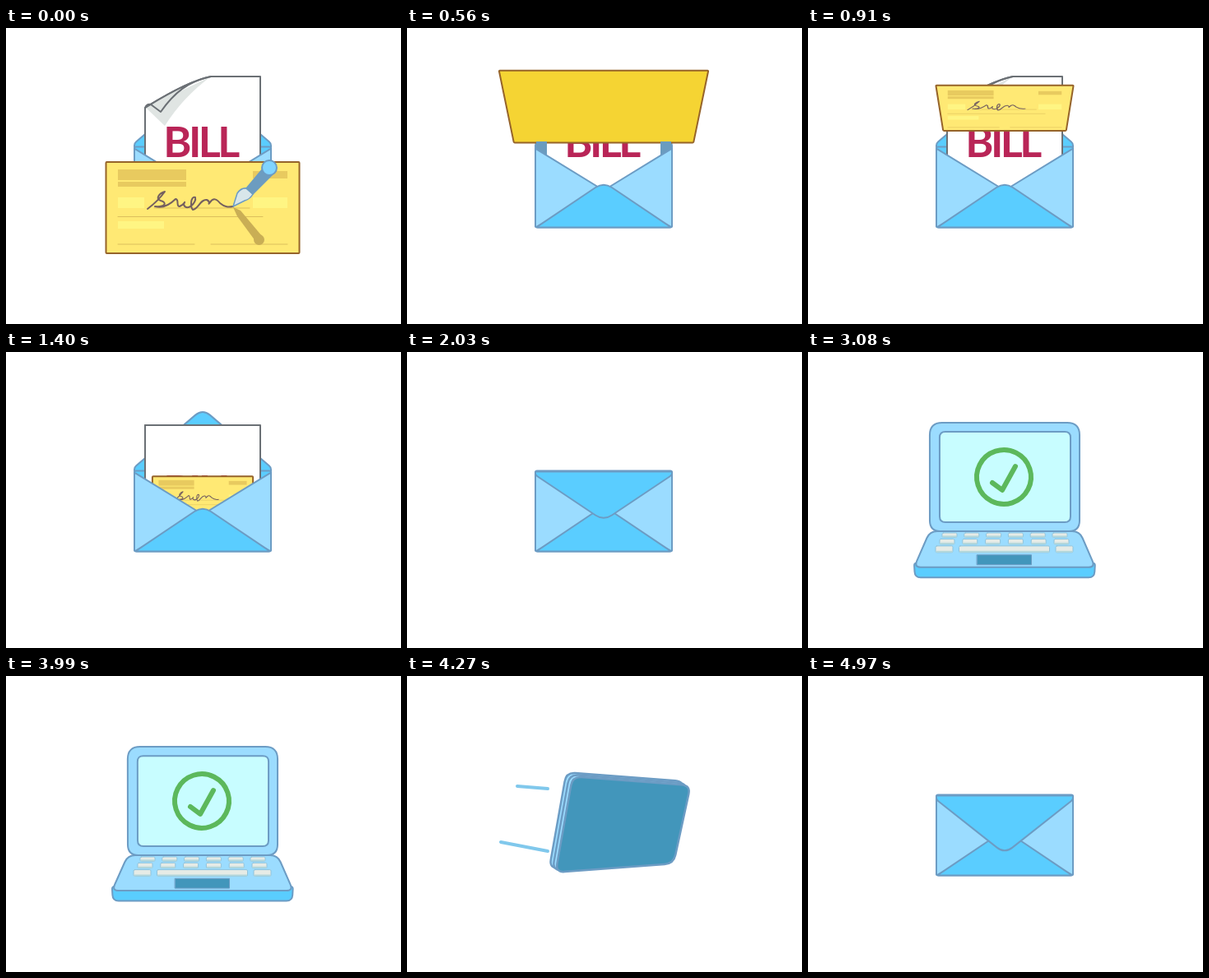
An HTML page that plays this animation: 480x360 px, repeating every 5.04 s.

```html
<!DOCTYPE html>
<html lang="en">
<head>
<meta charset="utf-8">
<title>Paying a bill</title>
<style>
  html, body { margin: 0; width: 100%; height: 100%; overflow: hidden; background: #fff; }
  svg { display: block; width: 480px; height: 360px; }
  text { font: 700 52px Lato, "Open Sans", sans-serif; letter-spacing: -3.5px; }
</style>
</head>
<body>
<svg id="stage" viewBox="0 0 480 360" stroke-linejoin="round" stroke-linecap="round"></svg>
<script>
const LOOP = 5040, STEP = 70, DEPTH = 450, MID = 239;
const LINE = '#6c9cc4', PALE = '#9bdcff', SKY = '#5acdff', DEEP = '#4296bb';
const { PI, sin, cos, min, max, abs, hypot, exp } = Math;
const stage = document.getElementById('stage');

// Progress from 0 to 1 between two times: even, and eased
const ramp = (t, a, b) => min(1, max(0, (t - a) / (b - a)));
const ease = (t, a, b) => { const u = ramp(t, a, b); return u * u * (3 - 2 * u); };

const shape = (d, fill, stroke = 'none', width = 2) =>
  `<path d="${d}" fill="${fill}" stroke="${stroke}" stroke-width="${width}"/>`;
const rect = (x, y, w, h, fill, more = '') =>
  `<rect x="${x}" y="${y}" width="${w}" height="${h}" fill="${fill}" ${more}/>`;

// Closed polygon; each point is [x, y, corner radius]
function poly(pts, fill, stroke = LINE, width = 2) {
  const toward = (p, q, r) => {
    const f = min(r / (hypot(q[0] - p[0], q[1] - p[1]) || 1), .5);
    return [p[0] + (q[0] - p[0]) * f, p[1] + (q[1] - p[1]) * f];
  };
  const d = pts.map((p, i) => {
    const prev = pts.at(i - 1), next = pts[(i + 1) % pts.length], r = p[2] || 0;
    return `${i ? 'L' : 'M'}${toward(p, prev, r)} Q${p[0]},${p[1]} ${toward(p, next, r)}`;
  }).join(' ');
  return shape(d + 'Z', fill, stroke, width);
}

// Projection of a card turned about its vertical axis
const view = (x, y, a = 0, shear = 0) => ([u, v, r]) => {
  const f = DEPTH / (DEPTH + u * sin(a));
  return [x + u * cos(a) * f - v * shear, y + v * f, r];
};

const box = (w, h, r) => [[-w, -h, r], [w, -h, r], [w, h, r], [-w, h, r]];
const back = see => poly(box(83, 49, 2).map(see), SKY);

// k runs from -1 (open) to 1 (closed)
const flap = (k, see) => poly([[-83, -48, 1], [-83, -48 + 5 * k, 3], [0, -48 + 73.5 * k, 12],
  [83, -48 + 5 * k, 3], [83, -48, 1]].map(see), SKY);

function pocket(see) {
  const side = s => poly([[83 * s, -47, 2], [83 * s, 49, 2], [0, 4]].map(see), PALE);
  return side(-1) + side(1) + poly([[-82, 49, 2], [0, -6.2, 12], [82, 49, 2]].map(see), SKY);
}

function bill(t, drop) {
  const curl = 1 - ease(t, 1050, 1330);
  const f = (x, y) => `${169 + x * curl},${59 + y * curl} `;
  const edge = 'C' + f(10, 32) + f(50, 6) + f(80, 0);
  return `<g transform="translate(0 ${drop})">` +
    shape(`M169,290 L${f(0, 38)}${edge}L309,59 309,290Z`, '#fff', '#6b7075') +
    shape(`M${f(1, 38)}L${f(24, 60)}Q${f(46, 25)}${f(80, 0)}Z`, '#e0e5e3') +
    shape(`M${f(0, 38)}${edge}C${f(52, 6)}${f(35, 20)}${f(19, 43)}L${f(7, 34)}Q${f(2, 33)}${f(0, 38)}Z`,
      '#dfe4e2', '#6b7075') +
    '<text x="236" y="156.5" text-anchor="middle" fill="#b92557">BILL</text></g>';
}

const SIGNATURE = 'M172,220C180,214 188,206 193,199C186,201 181,208 188,210C196,212 194,218 181,217' +
  'C192,220 200,214 206,208C211,208 206,217 211,217C218,214 218,208 216,215' +
  'C220,224 232,212 230,206C224,204 224,218 227,221C234,220 236,208 244,209' +
  'C250,212 244,216 248,212C252,206 256,208 260,213C266,218 270,218 276,217';

const chequeFace =
  rect(136, 172, 83, 13, '#e8ca5f') + rect(136, 187, 83, 6, '#e8ca5f') + rect(300, 174, 42, 9, '#e8ca5f') +
  rect(136, 206, 32, 13, '#fff583') + rect(300, 206, 42, 13, '#fff583') + rect(136, 235, 56, 9, '#fff583') +
  shape('M180,219H296M136,229.5H312M136,263H229M249,263H342', 'none', '#dcbf5c', 1) +
  shape(SIGNATURE, 'none', '#75605f');

// One full somersault along an arc, shrinking on the way down
function cheque(t, drop) {
  const u = ramp(t, 140, 1120), e = ease(t, 140, 1120);
  const a = 2 * PI * e, c = cos(a);
  const y = drop + 218.5 - 68.5 * e - 95 * sin(PI * u);
  const s = 1 - .48 * ease(t, 560, 1120);
  const tilt = ([u, v, r]) => {
    const f = s * DEPTH / (DEPTH - v * s * sin(a));
    return [MID + u * f, y + v * c * f, r];
  };
  const sheet = poly(box(117.5, 55.5, 1).map(tilt), c > 0 ? '#ffe974' : '#f5d433', '#96642a');
  return sheet + (c > .05 ?
    `<g transform="translate(${MID} ${y}) scale(${s} ${s * c}) translate(${-MID} -218.5)">${chequeFace}</g>` : '');
}

function pen(t) {
  if (t >= 350) return '';
  const dx = 230 * ramp(t, 0, 350) ** 2;
  return `<g clip-path="url(#paper)"><g transform="translate(${dx * .8} ${-dx * .1})">` +
    shape('M276,218 L285,222 311,253 303,259 281,229Z', '#c9ae55') +
    '<circle cx="307.5" cy="257.5" r="6.5" fill="#c9ae55"/></g></g>' +
    `<g transform="translate(${dx} ${-dx * .45})">` +
    shape('M276,217 L281,201 Q286,194 292,195 L300,202 Q297,208 290,210Z', '#d8e6ea', LINE, 1.5) +
    shape('M291,195 L312,170 324,179 300,203Z', '#6c9cc0') +
    `<circle cx="320" cy="170" r="9" fill="#80d4ff" stroke="${LINE}" stroke-width="2"/></g>`;
}

function letter(t) {
  const see = view(MID, 193.5);
  const k = 2 * ease(t, 1680, 2100) - 1.04;
  const drop = 240 * ramp(t, 1120, 1680) ** 3;
  const before = t < 560;
  let out = (k < 0 ? flap(k, see) : '') + back(see);
  if (t < 1680) out += `<g clip-path="url(#inside)">${bill(t, drop)}${before ? '' : cheque(t, drop)}</g>`;
  if (t >= 490 && t <= 630)
    out += rect(157, 138, 13, 19, '#6a9cbf') + rect(308, 138, 13, 19, '#6a9cbf');
  out += pocket(see) + (k >= 0 ? flap(k, see) : '');
  return out + (before ? cheque(t, 0) + pen(t) : '');
}

// Envelope on one side, closed laptop on the other
function spin(t) {
  const a = PI * (ease(t, 2170, 2500) + ease(t, 4150, 4590));
  const there = ramp(t, 2170, 2520), again = ramp(t, 4130, 4760);
  const shift = 48 * sin(PI * again) - 14 * sin(2 * PI * there);
  const shear = .2 * sin(2 * PI * again) + .15 * sin(PI * there);
  const p = ease(t, 2200, 2450) - ease(t, 4150, 4370);
  const x = MID + shift, y = 193.5 - 30 * p;
  if (cos(a) > 0) {
    const see = view(x, y, a, shear);
    return back(see) + pocket(see) + flap(.96, see);
  }
  const s = sin(a - PI), slab = box(83 + 8 * p * p, 50 + 13 * p * p, 11);
  const layer = (i, fill) => poly(slab.map(
    view(x - 7 * s * i, y - 4.5 * abs(s) * i, a - PI, shear)), fill, LINE, 2.5);
  return layer(2, PALE) + layer(1, PALE) + layer(0, DEEP);
}

// Speed lines that grow to the left, then shrink; t is 0 at full length
function streaks(t, late) {
  const from = 1 - ramp(t, -140, 0), to = 1 - ramp(t, 0, 160);
  if (from >= 1 || to <= 0) return '';
  const streak = (x, y, w, h) =>
    shape(`M${x + w * from},${y + h * from} L${x + w * to},${y + h * to}`, 'none', '#80c8ec', 4);
  return late ? streak(134, 134, 37, 3) + streak(114, 202, 57, 11)
    : streak(106, 130, 20, 2) + streak(107, 193, 52, -3);
}

function keyboard() {
  const cap = (x, y, w, h) => rect(x, y, w, h, '#e6ebe6', 'rx="1.5" stroke="#8fc3dc" stroke-width="1"') +
    rect(x + .5, y + h - 2, w - 1, 2, '#b4d8dc');
  let out = '';
  for (let i = 0; i < 6; i++)
    out += cap(163 + i * 26.8, 220, 18, 5.5) + cap(160 + i * 27.8, 227.5, 18, 6.5);
  return out + cap(155, 236, 21, 8) + cap(183.5, 236, 110, 8) + cap(301, 236, 21, 8) +
    rect(205.5, 247, 66, 12, DEEP, `stroke="${LINE}"`);
}

function tick(t, squash) {
  const line = (p, tag) => p &&
    `<${tag} pathLength="1" stroke-dasharray="${p} 2"/>` || '';
  return `<g fill="none" stroke="#5cb85c" stroke-width="6"
    transform="translate(238 152) scale(1 ${squash})">` +
    line(ramp(t, 2450, 2870), 'circle r="33" transform="rotate(207)"') +
    line(ramp(t, 2730, 2940), 'path d="M-14,7 L-2,16 14,-13"') + '</g>';
}

function laptop(t) {
  // Springs open, folds shut
  const age = t - 2450;
  const q = 1 - exp(-.0081 * age) * cos(.008 * age) - ease(t, 3980, 4200);
  const bend = 4 * q * (1 - q);
  const top = 102 - 16 * q, wide = 91 + 5 * bend, x = MID - 2 * bend;
  const inset = top + 11 + 8 * (1 - q);
  const front = 100 + 162 * q, open = min(1, max(0, 2 * q));
  const low = front + 1 + 11.5 * open;
  const l = MID - 8 * bend - 91 - 19 * open, r = MID - 8 * bend + 91 + 19 * open;
  const rim = front - 5 * max(0, 2 * q - 1);
  const strip = poly([[l, rim, 3], [r, rim, 3], [r - 1, low, 7], [l + 1, low, 7]], SKY);
  const lid =
    poly([[x - wide, top, 15], [x + wide, top, 15], [MID + 91, 218, 13], [MID - 91, 218, 13]], PALE) +
    poly([[x - wide + 12, inset, 7], [x + wide - 11, inset, 7], [MID + 80, 207, 7], [MID - 79, 207, 7]], '#c8fdff') +
    tick(t, .3 + .7 * q);
  if (low < 227)
    return lid + poly([[l, low - 2, 3], [r, low - 2, 3], [MID + 91, 227, 8], [MID - 91, 227, 8]], DEEP) + strip;
  return lid + strip +
    poly([[MID - 91, 218, 9], [MID + 91, 218, 9], [r, front, 8], [l, front, 8]], PALE) +
    `<g transform="translate(0 218) scale(1 ${max(0, (front - 218) / 44)}) translate(0 -218)">${keyboard()}</g>`;
}

const clips = `<defs><clipPath id="inside">${rect(0, 0, 480, 241, '#000')}</clipPath>
  <clipPath id="paper">${rect(122, 164, 233, 109, '#000')}</clipPath></defs>`;

function draw(now) {
  const t = Math.floor(now % LOOP / STEP) * STEP;
  const scene = t <= 2100 ? letter : t >= 2450 && t < 4200 ? laptop : spin;
  const late = t > LOOP / 2;
  stage.innerHTML = clips + streaks(t - (late ? 4270 : 2380), late) + scene(t);
}

function loop() {
  draw(performance.now());
  requestAnimationFrame(loop);
}
loop();
</script>
</body>
</html>
```
